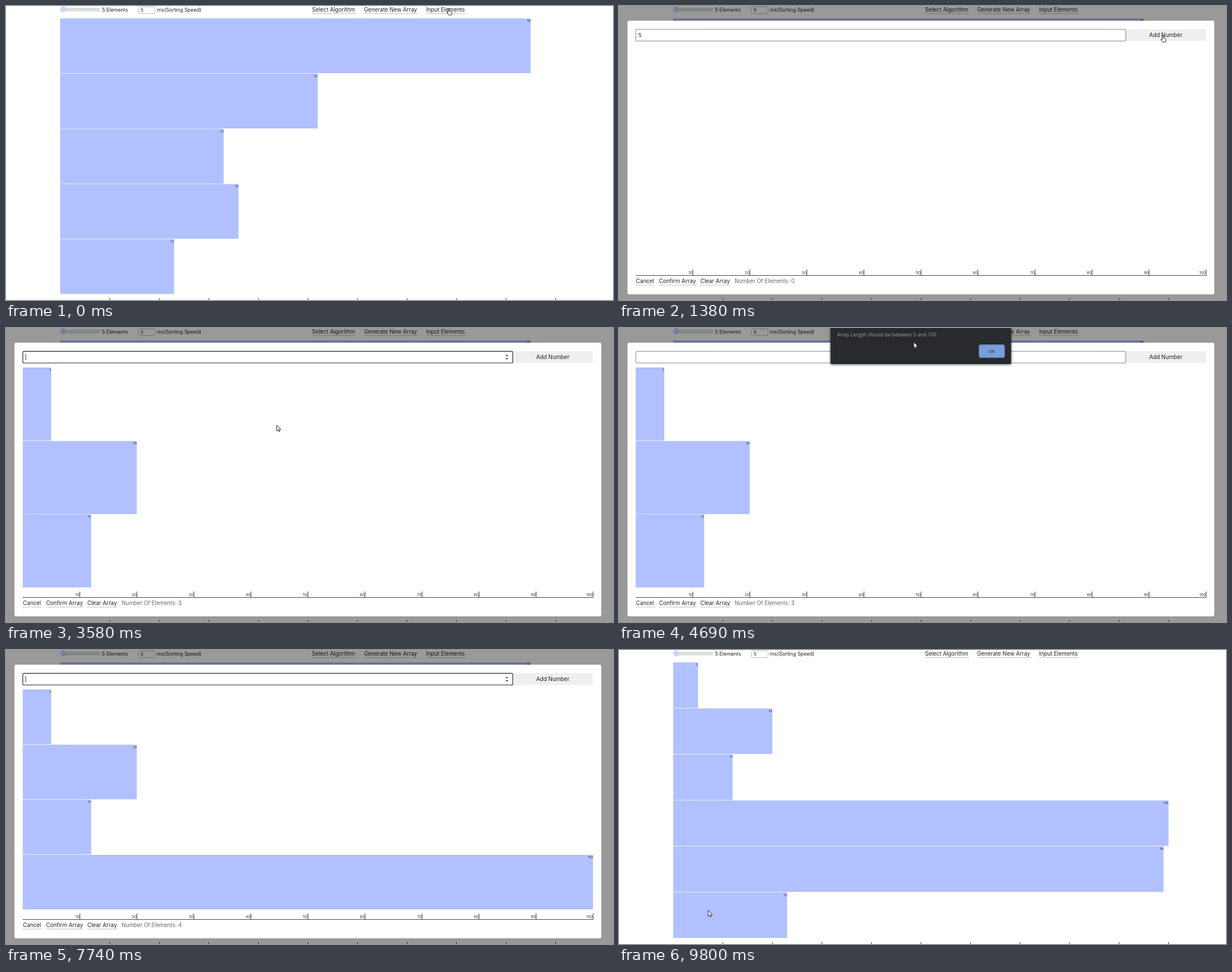
Animation, 1075 px wide and 521 px high, one loop 9960 ms. Source, as an HTML page with a canvas:

```html
<!DOCTYPE html>
<html lang="en">
<head>
<meta charset="utf-8">
<title>Sorting visualizer</title>
<style>
html, body { margin: 0; width: 100%; height: 100%; overflow: hidden; background: #fff; }
canvas { display: block; width: 1075px; height: 521px; }
</style>
</head>
<body>
<canvas id="stage" width="1075" height="521"></canvas>
<script>
const ctx = document.getElementById('stage').getContext('2d');
const LOOP = 9960, OPEN = 70, CLOSE = 9500;
const ALERT = [3980, 5510];
const FIRST = [95, 52, 33, 36, 23];
const ENTERED = [5, 20, 12, 100, 99, 23];
const BAR = '#b1c1ff', INK = '#222';
const UI = 'Inter, sans-serif', DIALOG = '"Open Sans", sans-serif';

// time, field text, number of bars in the dialog
const EDITS = [
  [0, '', 0], [870, '', 0], [970, '5', 0], [1430, '', 1], [1530, '', 1],
  [2010, '2', 1], [2110, '20', 1], [2540, '', 2], [2610, '1', 2], [2690, '12', 2],
  [3300, '', 3], [6320, '', 3], [7310, '1', 3], [7370, '10', 3], [7440, '100', 3],
  [7740, '', 4], [8200, '9', 4], [8350, '99', 4], [8450, '', 5], [8520, '2', 5],
  [8590, '23', 5], [8970, '', 6]
];
const FOCUS = [[870, 1330], [1530, 3900], [6240, 9450]];

// time, x, y of the pointer
const PATH = [
  [0, 784, 4], [90, 784, 4], [570, 640, 52], [920, 640, 52], [1330, 963, 52],
  [1430, 963, 52], [1530, 628, 47], [3430, 628, 47], [3860, 104, 489], [4000, 104, 489],
  [4420, 516, 27], [4690, 522, 25], [5000, 560, 32], [5460, 658, 42], [5560, 658, 42],
  [6060, 458, 57], [6470, 458, 57], [7940, 750, 57], [7990, 764, 61], [8720, 764, 61],
  [8870, 731, 51], [9350, 104, 489], [9510, 104, 489], [9750, 158, 461.5], [LOOP, 158, 461.5]
];

const within = (t, [a, b]) => t >= a && t < b;

function rect(x, y, w, h, fill, radius = 0, stroke, line = 1) {
  ctx.beginPath();
  ctx.roundRect(x, y, w, h, radius);
  if (fill) { ctx.fillStyle = fill; ctx.fill(); }
  if (stroke) { ctx.strokeStyle = stroke; ctx.lineWidth = line; ctx.stroke(); }
}

function text(str, x, y, size, { color = INK, align = 'left', font = UI } = {}) {
  ctx.font = `${size}px ${font}`;
  ctx.textAlign = align;
  ctx.fillStyle = color;
  ctx.fillText(str, x, y);
}

function link(str, x, right, y) {
  text(str, x, y, 9.8);
  rect(x, y + 3.2, right - x, 0.7, '#aaa');
}

function bars(values, x, y, unit, height) {
  const pitch = height / values.length;
  values.forEach((v, i) => {
    const top = y + i * pitch;
    rect(x, top, v * unit, pitch - 0.7, BAR);
    text(v, x + v * unit, top + 6, 5.4, { color: '#333', align: 'right' });
  });
}

function axis(x, y, unit) {
  rect(x, y, unit * 100, 1, '#444');
  for (let n = 10; n <= 100; n += 10) {
    const tick = x + n * unit;
    rect(tick - 0.3, y - 10, 1, 11, '#333');
    text(n, tick - 0.6, y - 2, 6.8, { color: '#333', align: 'right' });
  }
}

function page(values) {
  rect(0, 0, 1075, 521, '#fff');
  rect(97, 3, 70, 6.5, '#dcdedc', 3.2);
  ctx.beginPath();
  ctx.arc(101.3, 6, 5.4, 0, 7);
  ctx.fillStyle = '#c8d5ff';
  ctx.fill();
  text('5 Elements', 170, 10, 8.9);
  rect(234.5, 1.5, 29.5, 12, '#fff', 3, '#bbb');
  text('5', 238.5, 10.2, 8);
  text('ms(Sorting Speed)', 267.5, 10, 8.9);
  link('Select Algorithm', 542, 620, 10);
  link('Generate New Array', 634, 729.5, 10);
  link('Input Elements', 744, 814, 10);
  bars(values, 96, 22, 8.772, 489);
  axis(96, 527.5, 8.772);
}

function field(t, edit, hover) {
  const focused = FOCUS.some(span => within(t, span));
  rect(29.8, 41.3, 867.7, 20.7, '#fff', focused ? 2 : 1,
    focused ? '#222' : hover ? '#555' : '#767676', focused ? 1.15 : 0.9);
  text(edit[1], 34.5, 55, 8.9, { color: '#111' });
  if (focused && t - edit[0] < 450)
    rect(34.6 + ctx.measureText(edit[1]).width, 46, 0.8, 11, '#000');
  if (focused || hover) {
    ctx.fillStyle = '#444';
    for (const dir of [-1, 1]) {
      const y = 51.7 + dir * 1.6;
      ctx.beginPath();
      ctx.moveTo(884.6, y);
      ctx.lineTo(889.6, y);
      ctx.lineTo(887.1, y + dir * 3);
      ctx.fill();
    }
  }
}

function modal(t, edit, hover) {
  rect(0, 0, 1075, 521, 'rgba(0,0,0,.4)');
  rect(15, 26, 1039.3, 485, '#fff', 3);
  field(t, edit, hover);
  rect(898, 41, 141, 21, '#efefef');
  text('Add Number', 968.4, 55, 9.8, { align: 'center' });
  bars(ENTERED.slice(0, edit[2]), 29.6, 70, 10.1, 390.5);
  axis(29.6, 477, 10.1);
  link('Cancel', 30, 63.5, 491);
  link('Confirm Array', 71, 137, 491);
  link('Clear Array', 144, 197.5, 491);
  text('Number Of Elements: ' + edit[2], 205, 491, 9.65, { color: '#666' });
}

function alertBox() {
  ctx.save();
  ctx.shadowColor = 'rgba(0,0,0,.55)';
  ctx.shadowBlur = 5;
  ctx.shadowOffsetY = 1;
  rect(374.5, -6, 320, 70, '#292a2d', 2);
  ctx.restore();
  text('Array Length should be between 5 and 100', 386, 15, 8.8,
    { color: '#9da1a6', font: DIALOG });
  rect(637.5, 29.5, 45.5, 23, '#7a9ddb', 3, '#5876ad');
  text('OK', 660, 44, 8, { color: '#202632', align: 'center', font: DIALOG });
}

function pointerAt(t) {
  const i = PATH.findIndex(p => p[0] > t);
  const [t0, x0, y0] = PATH[i - 1], [t1, x1, y1] = PATH[i];
  const k = (t - t0) / (t1 - t0), e = k * k * (3 - 2 * k);
  return [x0 + (x1 - x0) * e, y0 + (y1 - y0) * e];
}

const SHAPES = {
  arrow: new Path2D('M0 0V10.4L2.4 8.2 4 11.6 5.6 10.9 4.1 7.6H7.3Z'),
  hand: new Path2D('M-1 1.2a1 1 0 0 1 2 0V4.8L4.6 5.6Q6 6 5.7 7.6L4.8 12H0L-3 7.8Q-3.2 6.4-1.9 6.9L-1 7.8Z'),
  beam: new Path2D('M-2.3-4.7H-.7L0-4.2 .7-4.7H2.3M0-4.2V4.2M-2.3 4.7H-.7L0 4.2 .7 4.7H2.3')
};

function pointer(kind, x, y) {
  ctx.save();
  ctx.translate(x, y);
  ctx.lineWidth = 0.9;
  ctx.lineJoin = 'round';
  ctx.strokeStyle = '#111';
  ctx.fillStyle = '#fff';
  if (kind !== 'beam') ctx.fill(SHAPES[kind]);
  ctx.stroke(SHAPES[kind]);
  ctx.restore();
}

function draw(t) {
  const open = within(t, [OPEN, CLOSE]), alerting = within(t, ALERT);
  const [x, y] = pointerAt(t);
  const hover = open && !alerting && x > 29 && x < 898 && y > 41 && y < 63;
  const overButton = x >= 898 && y > 41 && y < 63;
  const overLink = y > 482 && y < 496 && x < 198;
  const edit = EDITS.findLast(e => e[0] <= t);

  page(t < CLOSE ? FIRST : ENTERED);
  if (open) modal(t, edit, hover);
  if (alerting) alertBox();

  let kind = 'arrow';
  if (hover) kind = 'beam';
  else if (t < OPEN || (open && !alerting && (overButton || overLink))) kind = 'hand';
  if (!within(t, [6470, 7940])) pointer(kind, x, y);
}

const start = performance.now();
function tick() {
  draw((performance.now() - start) % LOOP);
  requestAnimationFrame(tick);
}
tick();
</script>
</body>
</html>
```
